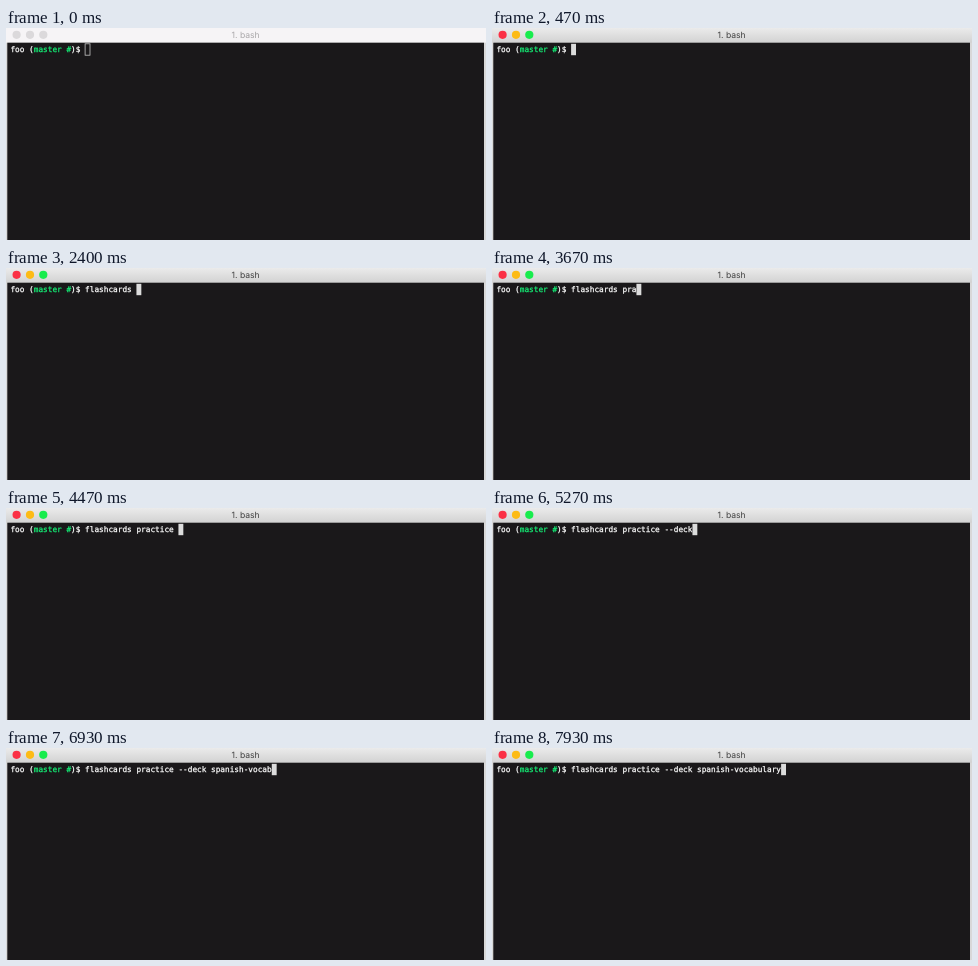
An HTML page that plays this animation: 480x212 px, repeating every 8000 ms.

```html
<!DOCTYPE html>
<html lang="en">
<head>
<meta charset="utf-8">
<title>Terminal</title>
<style>
  html, body { margin: 0; width: 100%; height: 100%; overflow: hidden; background: #d8d8d8; }
  svg { display: block; width: 480px; height: 212px; }
  text { white-space: pre; text-rendering: geometricPrecision; }
  .shell {
    font: 7.75px "DejaVu Sans Mono", monospace;
    fill: #fff; stroke: #fff; stroke-width: .25px;
  }
  .branch { fill: #14f277; stroke: #14f277; }
  .title { font: 8.6px Inter, "Liberation Sans", sans-serif; text-anchor: middle; fill: #404040; }
  .cursor { fill: #dcdcdc; stroke: none; }
  .bar { fill: url(#metal); }
  .red { fill: #fb3045; }
  .yellow { fill: #fdbb16; }
  .green { fill: #17ec4d; }
  .idle .bar { fill: #f6f4f6; }
  .idle circle { fill: #dbd9db; }
  .idle .title { fill: #a9a7a9; }
  .idle .cursor { fill: none; stroke: #c4c4c4; stroke-width: .8px; }
</style>
</head>
<body>
<svg id="window" class="idle" viewBox="0 0 480 212">
  <defs>
    <linearGradient id="metal" x2="0" y2="1">
      <stop stop-color="#ebebeb"/>
      <stop offset="1" stop-color="#d2d2d2"/>
    </linearGradient>
  </defs>
  <rect class="bar" width="480" height="14.7"/>
  <rect x="1.3" y="14.7" width="476.7" height="198" fill="#1a181a"/>
  <circle class="red" cx="10.6" cy="6.8" r="4.1"/>
  <circle class="yellow" cx="24" cy="6.8" r="4.1"/>
  <circle class="green" cx="37.3" cy="6.8" r="4.1"/>
  <text class="title" x="239.6" y="10">1. bash</text>
  <text class="shell" x="4.4" y="24.2">foo (<tspan class="branch">master #</tspan>)$ <tspan id="typed"></tspan></text>
  <rect id="cursor" class="cursor" y="15.8" width="4.9" height="11.4"/>
</svg>
<script>
  const LOOP = 8000, FOCUS = 330, START_X = 79.1, CELL = 14 / 3;

  // Typed in bursts of even speed; times in ms
  const BURSTS = [
    { text: "fl", start: 1070, step: 200 },
    { text: "ashcards ", start: 1730, step: 83 },
    { text: "practice ", start: 3380, step: 130 },
    { text: "--deck ", start: 4620, step: 120 },
    { text: "spanish", start: 5400, step: 115 },
    { text: "-vocabulary", start: 6290, step: 125 }
  ];

  const byId = id => document.getElementById(id);
  const win = byId("window"), typed = byId("typed"), cursor = byId("cursor");

  const typedPart = ({ text, start, step }, t) =>
    text.slice(0, Math.max(0, Math.floor((t - start) / step) + 1));

  function draw(now) {
    const t = now % LOOP;
    const line = BURSTS.map(burst => typedPart(burst, t)).join("");
    win.classList.toggle("idle", t < FOCUS);
    typed.textContent = line;
    cursor.setAttribute("x", START_X + line.length * CELL);
    requestAnimationFrame(draw);
  }
  draw(performance.now());
</script>
</body>
</html>
```
